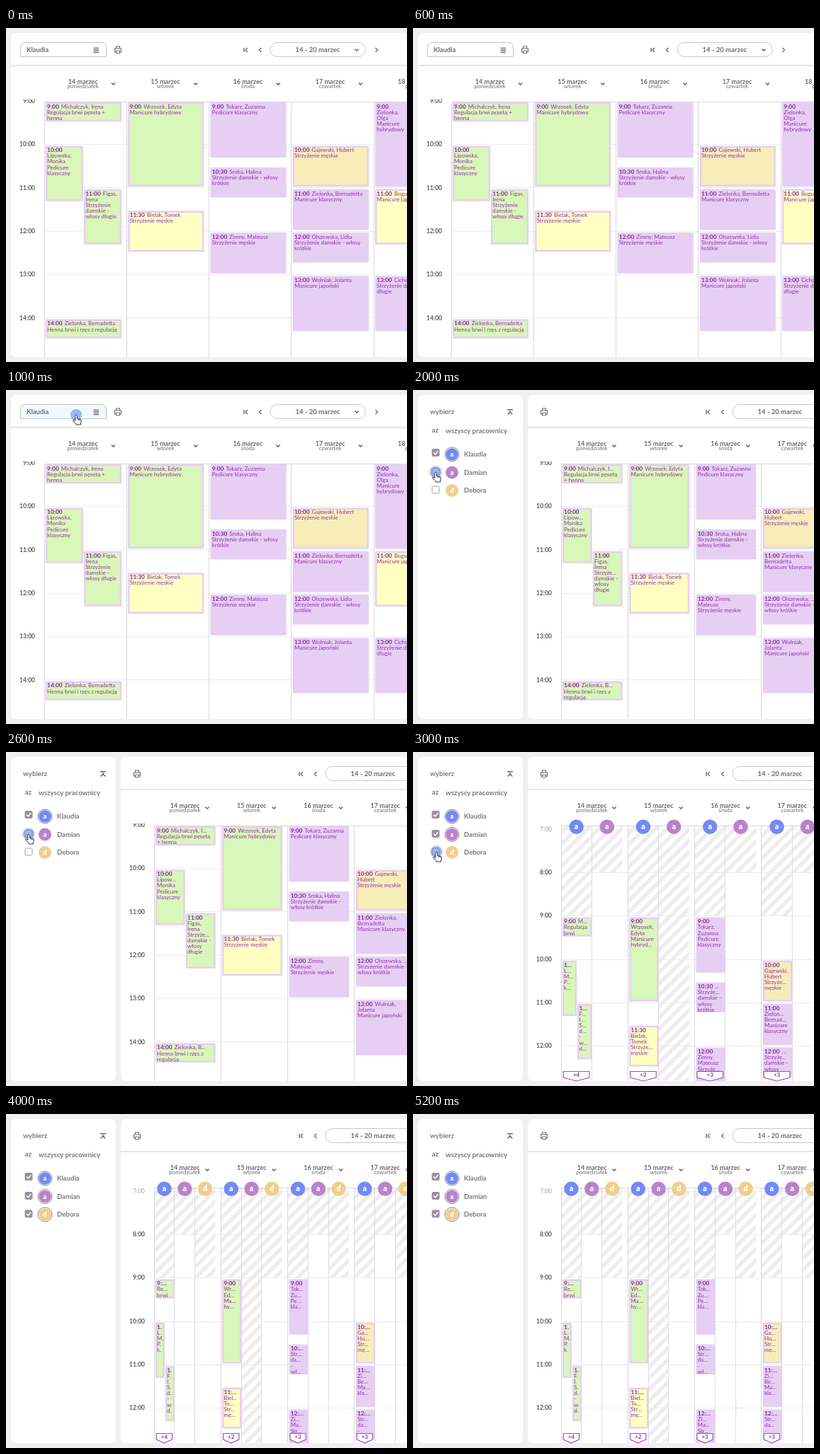
An HTML page for the animation above (6000 ms loop, 566 px wide and 472 px high).

```html
<!DOCTYPE html>
<html lang="pl">
<head>
<meta charset="utf-8">
<title>Kalendarz</title>
<style>
html, body { margin: 0; width: 100%; height: 100%; overflow: hidden; background: #f0f0f0; }
svg { display: block; font-family: Lato, "Open Sans", sans-serif; }
body > svg { position: absolute; left: 0; top: 0; }
</style>
</head>
<body>
<svg id="stage" width="566" height="472"></svg>
<script>
const GREY = '#6c6a6f', SOFT = '#7b797e', LILAC = '#e6cff2', GREEN = '#d9f7b8', YELLOW = '#ffffc2', TAN = '#f6edb9';
const HOUR = 61.3;
const DAYS = ['poniedziałek', 'wtorek', 'środa', 'czwartek', 'piątek'];
const STAFF = [['Klaudia', 'a', '#7389f6'], ['Damian', 'a', '#b983cb'], ['Debora', 'd', '#efcf8e']];
const ROWS = [[88.5, 91], [115.5, 116.5], [141, 142]]; // checkbox y, avatar y

// day, start, hours, colour, half (0 full, 1 left, 2 right), then the lines for each layout
const EVENTS = [
  [0, 9, .5, GREEN, 0, '9:00 Michalczyk, Irena|Regulacja brwi pęsetą +|henna',
    '9:00 Michalczyk, I…|Regulacja brwi pęsetą|+ henna', '9:00 M…|Regulacja|brwi', '9:…|Re…|brwi'],
  [0, 10, 4 / 3, GREEN, 1, '10:00|Lipowska,|Monika|Pedicure|klasyczny',
    '10:00|Lipow…|Monika|Pedicure|klasyczny', '1…|L…|M…|P…|k…', '1.|L.|M.|P.|k.'],
  [0, 11, 4 / 3, GREEN, 2, '11:00 Figas,|Irena|Strzyżenie|damskie -|włosy długie',
    '11:00|Figas,|Irena|Strzyże…|damskie -|włosy|długie', '1…|F…|I…|S…|d…|-|w…|d…', '1.|F.|I.|S.|d.|-|w|d.'],
  [0, 14, .5, GREEN, 0, '14:00 Zielonka, Bernadetta|Henna brwi i rzęs z regulacją',
    '14:00 Zielonka, B…|Henna brwi i rzęs z|regulacją'],
  [1, 9, 2, GREEN, 0, '9:00 Wrzosek, Edyta|Manicure hybrydowy',
    '9:00 Wrzosek, Edyta|Manicure hybrydowy', '9:00|Wrzosek,|Edyta|Manicure|hybryd…', '9:00|Wr…|Ed…|Ma…|hy…'],
  [1, 11.5, 1, YELLOW, 0, '11:30 Bielak, Tomek|Strzyżenie męskie',
    '11:30 Bielak, Tomek|Strzyżenie męskie', '11:30|Bielak,|Tomek|Strzyże…|męskie', '11:…|Biel…|To…|Str…|mę…'],
  [2, 9, 4 / 3, LILAC, 0, '9:00 Tokarz, Zuzanna|Pedicure klasyczny',
    '9:00 Tokarz, Zuzanna|Pedicure klasyczny', '9:00|Tokarz,|Zuzanna|Pedicure|klasyczny', '9:00|Tok…|Zu…|Pe…|kla…'],
  [2, 10.5, .75, LILAC, 0, '10:30 Sroka, Halina|Strzyżenie damskie - włosy|krótkie',
    '10:30 Sroka, Halina|Strzyżenie damskie -|włosy krótkie', '10:30 …|Strzyże…|damskie -|włosy|krótkie', '10:…|Str…|da…|-|wł…'],
  [2, 12, 1, LILAC, 0, '12:00 Zimny, Mateusz|Strzyżenie męskie',
    '12:00 Zimny,|Mateusz|Strzyżenie męskie', '12:00|Zimny,|Mateusz|Strzyże…|męskie', '12:…|Zi…|Ma…|Str…|mę…'],
  [3, 10, 1, TAN, 0, '10:00 Gajewski, Hubert|Strzyżenie męskie',
    '10:00 Gajewski,|Hubert|Strzyżenie męskie', '10:00|Gajewski,|Hubert|Strzyże…|męskie', '10:…|Ga…|Hu…|Str…|mę…'],
  [3, 11, 1, LILAC, 0, '11:00 Zielonka, Bernadetta|Manicure klasyczny',
    '11:00 Zielonka,|Bernadetta|Manicure klasyczny', '11:00|Zielon…|Bernad…|Manicure|klasyczny', '11:…|Zi…|Be…|Ma…|kla…'],
  [3, 12, .75, LILAC, 0, '12:00 Olszewska, Lidia|Strzyżenie damskie - włosy|krótkie',
    '12:00 Olszewska, …|Strzyżenie damskie -|włosy krótkie', '12:00 …|Strzyże…|damskie -|włosy|krótkie', '12:…|Str…|da…|-|wł…'],
  [3, 13, 4 / 3, LILAC, 0, '13:00 Wolniak, Jolanta|Manicure japoński',
    '13:00 Wolniak,|Jolanta|Manicure japoński'],
  [4, 9, 2, LILAC, 1, '9:00|Zielonka,|Olga|Manicure|hybrydowy'],
  [4, 11, 4 / 3, YELLOW, 0, '11:00 Bogusz, Iza|Manicure japoński'],
  [4, 13, 4 / 3, LILAC, 0, '13:00 Cichoń, Ola|Strzyżenie damskie - włosy|długie']
];

const rect = (x, y, w, h, fill, rx = 0, extra = '') =>
  `<rect x="${x}" y="${y}" width="${w}" height="${h}" rx="${rx}" fill="${fill}" ${extra}/>`;
const line = (d, color = GREY, w = 1.4) => `<path d="${d}" fill="none" stroke="${color}" stroke-width="${w}"/>`;
const text = (x, y, s, size, fill = GREY, anchor = 'start', weight = 700) =>
  `<text x="${x}" y="${y}" font-size="${size}" fill="${fill}" text-anchor="${anchor}" font-weight="${weight}">${s}</text>`;
const circle = (x, y, r, fill, extra = '') => `<circle cx="${x}" cy="${y}" r="${r}" fill="${fill}" ${extra}/>`;
const clip = (y, h, body) =>
  `<svg x="0" y="${y}" width="566" height="${h}" viewBox="0 ${y} 566 ${h}">${body}</svg>`;
const chevron = (x, y) => line(`M${x - 2.5} ${y - 1.4}l2.5 2.6 2.5-2.6`, GREY, 1.6);
const crisp = v => Math.round(v) - .5; // centre of a one-pixel line

const avatar = (x, y, r, [, letter, color]) =>
  circle(x, y, r, color) + text(x, y + 3, letter, r + .5, '#fff', 'middle', 900);

function printer(x) {
  return line(`M${x - 2.5} 29v-3h5v3M${x - 2.5} 34h-2v-5h9v5h-2M${x - 2.5} 32.2h5v3.6h-5z`, GREY, 1.1);
}

function toolbar(side) {
  const dx = side ? 78 : 0, x = 338 + dx;
  return line(`M${side ? 162 : 7} 53H566`, '#dedee0', 1.5) + printer(side ? 185 : 158) +
    line(`M${x - 2} 28v6M${x + 3} 28l-3 3 3 3M${x + 22.5} 28l-3 3 3 3M${x + 183.5} 28l3 3-3 3`) +
    rect(373 + dx, 20.5, 134.5, 20, '#fff', 10, 'stroke="#c9c7cc"') +
    text(440 + dx, 34.3, '14 - 20 marzec', 9.5, GREY, 'middle') + chevron(495 + dx, 31);
}

function picker(active) {
  return `<path d="M20.5 40.5V28q0-7.5 7.5-7.5H134q7.5 0 7.5 7.5V40.5z" fill="${active ? '#eefaff' : '#fff'}" stroke="#c3c1c6"/>` +
    text(29, 34, STAFF[0][0], 9.4) + line('M123.5 28h7.5m-7.5 2.2h7.5m-7.5 2.2h7.5m-7.5 2.2h7.5', GREY, 1.2);
}

function sidebar(chosen) {
  let s = rect(7, 7, 148, 458, '#fff', 7) + text(24, 34, 'wybierz', 9.7, SOFT) +
    line('M133 27.7h8M133.7 34.5l3.3-3.5 3.3 3.5M137 31v-2') +
    text(26.5, 60, 'az', 10, SOFT) + text(46, 60.5, 'wszyscy pracownicy', 9.7, SOFT);
  STAFF.forEach((person, i) => {
    const [box, y] = ROWS[i], on = i < chosen;
    s += rect(27, box - 5, 10, 10, on ? '#9b8f9e' : '#fff', 1.5, `stroke="${on ? '#9b8f9e' : '#a09ca4'}"`);
    if (on) s += line(`M29 ${box}l2.3 2.4 4-4.6`, '#fff', 1.5) + circle(55, y, 10, '#fff', 'stroke="#8a8790"');
    s += avatar(55, y, on ? 8.8 : 9, person) + text(72, y + 3.2, person[0], 9.5, SOFT);
  });
  return s;
}

function eventBox([day, start, hours, color, half, ...lines], g) {
  const label = lines[g.layout];
  if (!label) return '';
  let x = g.col(day) + 1.8, w = g.lane - 1.5;
  if (half == 2) x += (w + 1) / 2;
  if (half) w = (w - 1) / 2;
  const y = g.at(start) + 1.3, h = hours * HOUR - 3.5;
  let s = rect(x, y, w, h, LILAC, 1.5);
  if (color != LILAC) s += rect(x + 2.5, y + 2.5, w - 5, h - 5, color);
  label.split('|').forEach((row, i) => {
    let body = row;
    if (!i) {
      const [time, ...rest] = row.split(' ');
      body = `<tspan font-weight="700" font-size="8.4" fill="#8424a6">${time}</tspan>` +
        (rest.length ? `<tspan dx="3">${rest.join(' ')}</tspan>` : '');
    }
    s += text(x + 2.3, y + 8.8 + i * 8.1, body, 7.9, '#932fb2', 'start', 400);
  });
  return s;
}

function calendar(layout, dx) {
  const pitch = dx ? 94.3 : 116.3, lanes = Math.max(1, layout), split = layout > 1;
  const lane = (dx ? 86.5 : 108.8) / lanes, nine = split ? 232.2 : 103.8;
  const g = { layout, lane, col: d => 54 + dx + d * pitch, at: h => nine + (h - 9) * HOUR };
  const left = g.col(0);
  let heads = '', hatch = '', grid = '', labels = '', over = '';

  for (let h = split ? 7 : 9; h < 15; h++) {
    grid += line(`M${left} ${crisp(g.at(h))}H566`, '#ececee', 1);
    labels += text(left - 13, g.at(h) + 2.2, h + ':00', 8.5, h == 7 ? '#bdbbc0' : '#5c5a60', 'end');
  }
  DAYS.forEach((name, d) => {
    const x = g.col(d), mid = x + (dx ? 43.5 : 54.7);
    heads += text(mid, 78.7, 14 + d + ' marzec', 9.1, GREY, 'middle') +
      text(mid, 85.2, name, 8, GREY, 'middle', 400) + chevron(x + (dx ? 75 : 97.5), 79);
    grid += line(`M${crisp(x + .5)} 104V465`, '#d9d8dc', 1);
    if (!split) return;
    for (let i = 0; i < lanes; i++) {
      const lx = x + i * lane, end = i != 1 ? g.at(9) : d == 1 ? 465 : g.at(8);
      hatch += rect(lx, 105, lane, end - 105.7, 'url(#hatch)');
      if (i) grid += line(`M${crisp(lx + .5)} 104V465`, '#dfdce2', 1);
      over += avatar(lx + lane / 2, 105.7, 10.2, STAFF[i]);
    }
    const c = x + lane / 2, r = lane / 2 - 3.3;
    over += `<path d="M${c - r} 451.5h${2 * r}v8.5L${c} 465 ${c - r} 460z" fill="#fff" stroke="#a052c0" stroke-width="1.2"/>` +
      text(c, 459, '+' + [4, 2, 3, 3, 2][d], 8, '#8a35aa', 'middle');
  });
  const events = EVENTS.map(e => eventBox(e, g)).join('');
  return heads + clip(101, 364, labels) +
    clip(104, 361, hatch + grid + line(`M${left} 104.5H566`, '#d9d8dc', 1) + events) + over;
}

function pointer(x, y, halo) {
  return circle(x, y, halo, '#777', 'opacity=".1"') + circle(x, y, 8, '#5b83e8', 'opacity=".55"') +
    `<path transform="translate(${x} ${y})" d="M-1.2 8.5V1.6a1.3 1.3 0 0 1 2.6 0V5.6l4.6.9q1.6.4 1.4 2.1L6.5 12v2H0V12.5L-4.2 8.8q-.8-1.6 1-1.6z" ` +
    `fill="#fff" stroke="#34323a" stroke-linejoin="round"/>` + line(`M${x + 3.3} ${y + 6}v2.2m2-1.8v2`, '#34323a', .8);
}

function scene(step) {
  const layout = Math.max(0, step - 1), dx = layout ? 155 : 0;
  const press = [, [99, 35, 0], [32, 116, 10], [33, 141, 10]][step];
  return '<defs><pattern id="hatch" width="11.3" height="11.3" patternUnits="userSpaceOnUse" patternTransform="rotate(45)">' +
    rect(0, 0, 5.2, 11.3, '#eeecec') + '</pattern></defs>' +
    rect(7 + dx, 7, 600, 458, '#fff', 7) + toolbar(layout > 0) + calendar(layout, dx) +
    (dx ? sidebar(layout) : picker(step == 1)) + (press ? pointer(...press) : '');
}

const stage = document.getElementById('stage');
let shown = -1;
function tick() {
  const step = Math.min(4, Math.floor(performance.now() % 6000 / 1000));
  if (step != shown) stage.innerHTML = scene(shown = step);
  requestAnimationFrame(tick);
}
tick();
</script>
</body>
</html>
```
